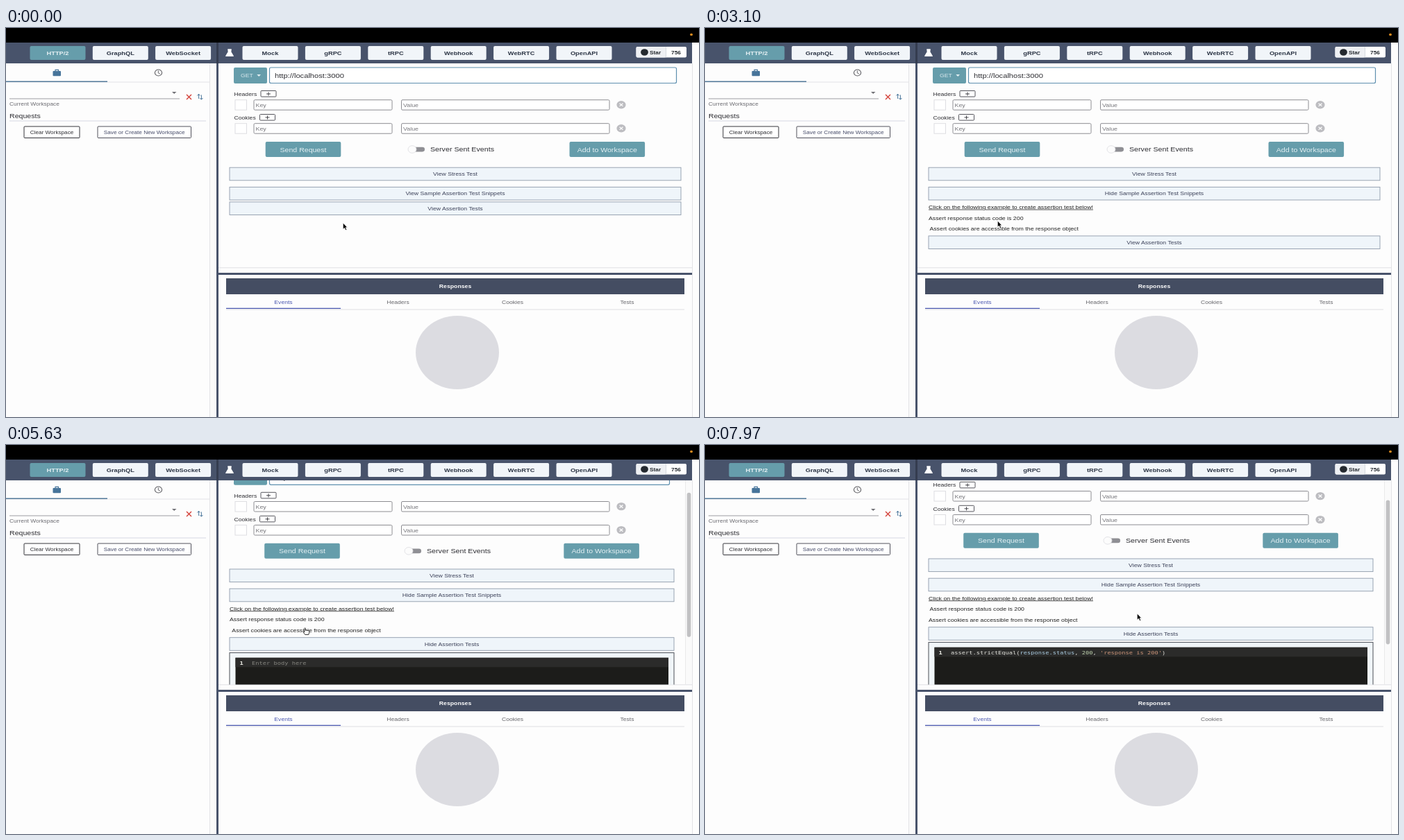
These frames come from a looping animation (998 px wide and 561 px high, 8 s). An HTML page:

```html
<!DOCTYPE html>
<html lang="en">
<head>
<meta charset="utf-8">
<title>API test client</title>
<style>
  html, body { margin: 0; width: 100%; height: 100%; overflow: hidden; background: #fdfdfd; }
  svg { display: block; width: 998px; height: 561px; }
  text { white-space: pre; }
</style>
</head>
<body>
<svg viewBox="0 0 998 561">
  <defs>
    <clipPath id="paneClip"><rect x="306" y="51" width="682" height="294.5"/></clipPath>
  </defs>
  <g id="chrome"></g>
  <g clip-path="url(#paneClip)"><g id="pane"></g></g>
  <g id="scrollbar">
    <rect x="978" y="51" width="10" height="294" fill="#fafafa"/>
    <path d="M978.5 51V345" stroke="#e9e9ea"/>
    <rect id="thumb" x="980.7" width="5.6" height="208" rx="2.8" fill="#c1c1c3"/>
  </g>
  <g id="cursor" stroke-linejoin="round">
    <path id="arrow" d="M0 0V9.2L2.2 7.3 3.8 10.6 5.4 9.9 3.9 6.7H6.4Z" fill="#000" stroke="#fff" stroke-width=".7"/>
    <path id="hand" d="M-1.7 5.6V1Q-.8-.4 0 1V4L1.2 3.6 2.3 4.1 3.5 4 4.6 4.6Q5.5 4.6 5.3 6.2L4.3 10H-.8L-3.2 6.8Q-3.4 5.4-1.7 6.5Z" fill="#fff" stroke="#222" stroke-width=".9"/>
  </g>
</svg>
<script>
const LOOP = 8000;
const ASPECT = 1.155; // the screen is shown slightly wider than tall
const SANS = "'Liberation Sans', Arial, sans-serif";
const MONO = "'DejaVu Sans Mono', monospace";
const NAVY = '#48536b', TEAL = '#669dab', INK = '#2e2e33', BLUE = '#4a57b0';
const $ = id => document.getElementById(id);

const rect = (x, y, w, h, fill, stroke = 'none', r = 0, width = 1) =>
  `<rect x="${x}" y="${y}" width="${w}" height="${h}" rx="${r}" fill="${fill}" stroke="${stroke}" stroke-width="${width}"/>`;
const path = (d, stroke, width = 1, fill = 'none') =>
  `<path d="${d}" fill="${fill}" stroke="${stroke}" stroke-width="${width}"/>`;
const ellipse = (x, y, rx, ry, fill, more = '') =>
  `<ellipse cx="${x}" cy="${y}" rx="${rx}" ry="${ry}" fill="${fill}" ${more}/>`;
// y is the middle of the capitals
const label = (str, x, y, size, fill = INK, { anchor = 'start', weight = 400, font = SANS, more = '' } = {}) =>
  `<text transform="translate(${x} ${y + size * .36}) scale(${ASPECT} 1)" font-family="${font}" font-size="${size}" ` +
  `font-weight="${weight}" text-anchor="${anchor}" fill="${fill}" ${more}>${str}</text>`;
const centred = (str, x, y, size, fill, weight) => label(str, x, y, size, fill, { anchor: 'middle', weight });

function navButton(name, x, active) {
  return rect(x, 26, 80, 20, active ? TEAL : '#f1f5f9', 'none', 2) +
    centred(name, x + 40, 36, 8.05, active ? '#e6f1f4' : '#2b3444', 700);
}

function drawChrome() {
  const left = ['HTTP/2', 'GraphQL', 'WebSocket'].map((n, i) => navButton(n, 34.5 + i * 90.3, !i));
  const right = ['Mock', 'gRPC', 'tRPC', 'Webhook', 'WebRTC', 'OpenAPI'].map((n, i) => navButton(n, 340.5 + i * 90.4));
  const tabs = ['Events', 'Headers', 'Cookies', 'Tests'].map((n, i) =>
    centred(n, 399.5 + i * 165, 395, 7.45, i ? '#66666b' : BLUE));
  return [
    rect(0, 0, 998, 21, '#000'), ellipse(987, 9.5, 2, 1.8, '#d98a1f'),
    rect(0, 21, 988, 30, NAVY), ...left, ...right,
    rect(303, 21, 3, 30, '#343c4f'),
    path('M320 31H324V34.5L327.5 40.5H316.5L320 34.5Z', '#fff', 1, '#fff'),
    path('M319 31H325', '#fff'),
    rect(907.5, 27, 72.5, 15.5, '#fff', 'none', 2),
    rect(907.5, 27, 43, 15.5, '#eef0f3', 'none', 2),
    path('M950.5 27V42.5', '#cfd3d8', .8),
    ellipse(919.5, 35, 5.4, 4.8, '#24292f'),
    label('Star', 927, 35, 7.2, '#24292f', { weight: 700 }),
    centred('756', 965, 35, 7.2, '#24292f', 700),

    // workspace column
    rect(293, 51, 10, 510, '#fafafa'), path('M293.5 51V561', '#e3e3e6'),
    path('M988.5 51V561', '#e3e3e6'),
    rect(303, 51, 3, 510, NAVY),
    path('M0 78H293', '#e2e2e6'), path('M0 77.2H146', '#52799a', 1.6),
    rect(67.5, 62, 11.5, 7.2, '#47749a', 'none', 1), path('M71 62V60.3H75.5V62', '#47749a', 1.2),
    ellipse(219.5, 64.5, 5.1, 4.5, 'none', 'stroke="#606065" stroke-width="1.1"'),
    path('M219.3 61.5V64.8L221.8 66.2', '#606065', 1),
    path('M239 92L242.2 95 245.5 92Z', 'none', 0, '#717176'),
    path('M5 102H250', '#929297', .9),
    path('M260 96L267 103M267 96L260 103', '#d23a32', 1.3),
    path('M277.6 102V95.5M275.6 97.5L277.6 95.3 279.6 97.5M281.4 96.5V103M279.4 101L281.4 103.2 283.4 101', '#47749a', 1),
    label('Current Workspace', 5, 109.5, 7.25, '#6a6a70'),
    label('Requests', 5, 127, 9.2),
    path('M5 134H288', '#d5d8e2'),
    rect(26, 142, 80, 16.5, '#fff', '#34343a', 1), centred('Clear Workspace', 66, 150.5, 7.1),
    rect(132, 142, 134.5, 16.5, '#fff', '#50505a', 1),
    centred('Save or Create New Workspace', 199.2, 150.5, 7.1, '#454a68'),

    // responses
    path('M306 345.8H988', '#e0e0e4'), rect(306, 353, 682, 3, NAVY),
    rect(317, 361, 660, 23, '#444d62'), centred('Responses', 647, 372.3, 7.55, '#fff', 700),
    ...tabs,
    path('M317 406H977', '#dedee2'), path('M317 404.3H482', BLUE, 1.3),
    ellipse(650, 468, 60, 53, '#dcdce1')
  ].join('');
}

function fieldRow(name, y, plusX) {
  return label(name, 328.5, y, 7.5) +
    rect(plusX, y - 4.5, 22, 8.6, '#fff', '#55555c', 1) +
    path(`M${plusX + 8} ${y}h6m-3-2.6v5.2`, '#35353c', .9) +
    rect(330, y + 8.7, 16.5, 14.5, '#fff', '#dedee2') +
    [['Key', 357, 199], ['Value', 569.5, 299.5]].map(([hint, x, w]) =>
      rect(x, y + 8.7, w, 14.5, '#fff', '#8c8c91', 1.5) + label(hint, x + 2.5, y + 16, 7.7, '#77777c')).join('') +
    ellipse(886, y + 15.8, 6.6, 5.7, '#bdbdc1') +
    path(`M883.6 ${y + 13.7}l4.8 4.2m0-4.2l-4.8 4.2`, '#fff', 1.2);
}

const tealButton = (name, x, y) =>
  rect(x - 54.3, y - 11, 108.6, 22, TEAL, 'none', 2) + centred(name, x, y + .3, 9.15, '#e4f0f3');

function drawPane({ snippets, tests, filled, statusShift, cookieShift }) {
  const inset = tests ? 10 : 0; // room taken by the scrollbar
  const mid = 647 - inset / 2;
  const bar = (name, y) => rect(322, y - 9.3, 650 - inset, 18.6, '#eff5fa', '#8f9bab', 0, .9) +
    centred(name, mid, y, 7.53, '#3b4058');
  const switchX = 579 - inset / 2;
  const out = [
    rect(328, 57, 48, 23, TEAL, 'none', 2), label('GET', 338, 68.5, 7.5, '#d9e9ed'),
    path('M361.3 67L364.2 70 367 67Z', 'none', 0, '#e4f0f3'),
    rect(379.5, 57, 586 - inset, 22.5, '#fff', '#5d8fae', 2, 1.2),
    label('http://localhost:3000', 387, 68.4, 9.67),
    fieldRow('Headers', 95, 367), fieldRow('Cookies', 129, 365.5),
    tealButton('Send Request', 428 - inset * .15, 175),
    rect(switchX + 4, 171.8, 20, 6.6, '#8f8f94', 'none', 3.3),
    ellipse(switchX + 6, 175, 6, 5.3, '#fcfcfc', 'stroke="#dcdce0" stroke-width=".8"'),
    label('Server Sent Events', 611 - inset / 2, 175, 9.25),
    tealButton('Add to Workspace', 865.8 - inset * .82, 175),
    bar('View Stress Test', 210.5),
    bar(`${snippets ? 'Hide' : 'View'} Sample Assertion Test Snippets`, 238.7)
  ];
  if (snippets) out.push(
    label('Click on the following example to create assertion test below!', 322, 258, 7.6, '#222', { more: 'text-decoration="underline"' }),
    label('Assert response status code is 200', 322 + statusShift, 273.8, 7.6, '#222'),
    label('Assert cookies are accessible from the response object', 322 + cookieShift, 289.4, 7.6, '#222'));
  out.push(bar(`${tests ? 'Hide' : 'View'} Assertion Tests`, snippets ? 309.2 : 260.2));
  if (tests) {
    const span = (color, str) => `<tspan fill="${color}">${str}</tspan>`;
    const code = filled
      ? 'assert.strictEqual(' + span('#a9cbe0', 'response.status') + ', ' + span('#bfd3ae', '200') + ', ' +
        span('#cb9478', "'response is 200'") + ')'
      : span('#85857f', 'Enter body here');
    out.push(
      rect(322, 321.8, 640, 120, '#f1f6f9', '#4b4f57'),
      rect(330.5, 329, 623.5, 105, '#1c1c1a'), rect(330.5, 329, 623.5, 13.5, '#2b2b2a'),
      label('1', 336.5, 336.3, 7.55, '#f0f0ea', { font: MONO, weight: 700 }),
      label(code, 354, 336.3, 7.55, '#e2e2dc', { font: MONO }));
  }
  return out.join('');
}

// Each key is [time, ...values]; values ease from one key to the next.
function track(keys, t) {
  let i = keys.findIndex(k => k[0] > t);
  if (i < 0) return keys.at(-1).slice(1);
  const a = keys[i - 1], b = keys[i];
  const u = (t - a[0]) / (b[0] - a[0]), e = u * u * (3 - 2 * u);
  return a.slice(1).map((v, j) => v + (b[j + 1] - v) * e);
}

const pointerPath = [
  [0, 485.3, 281], [1300, 485.3, 281], [1750, 485.3, 237.3], [2450, 485.3, 237.3], [2800, 440, 286],
  [3100, 421.3, 278], [3300, 421, 276], [3700, 492, 309], [4000, 492, 308], [4230, 492, 298.8],
  [4900, 470, 290], [5350, 431.5, 263.5], [5750, 431.5, 263.5], [6150, 421, 251.5], [7350, 421, 251.5],
  [7850, 612, 238], [7970, 622.3, 243], [LOOP, 622.3, 243]
];
const handTimes = [[1600, 2500], [2700, 2980], [3250, 4150], [5200, 7930]];
const scrollKeys = [[0, 0], [4450, 0], [4850, 22.2], [7100, 22.2], [7450, 37.2], [LOOP, 37.2]];
const statusKeys = [[0, 0], [2600, 0], [2700, 2], [2850, 0], [5800, 0], [6000, 3.3], [7860, 3.3], [8060, 0]];
const cookieKeys = [[0, 0], [2720, 0], [2850, 3.3], [2990, 3.3], [3190, 0], [3400, 0], [3550, 3.3],
  [3700, 0], [5150, 0], [5350, 3.3], [5800, 3.3], [6000, 0], [LOOP, 0]];

let shown = '';
function frame() {
  const t = performance.now() % LOOP;
  const state = {
    snippets: t >= 2250, tests: t >= 3850, filled: t >= 6850,
    statusShift: track(statusKeys, t)[0], cookieShift: track(cookieKeys, t)[0]
  };
  const key = JSON.stringify(state);
  if (key !== shown) {
    $('pane').innerHTML = drawPane(state);
    shown = key;
  }
  const [scroll] = track(scrollKeys, t);
  $('pane').setAttribute('transform', `translate(0 ${-scroll})`);
  $('scrollbar').style.display = state.tests ? '' : 'none';
  $('thumb').setAttribute('y', 53 + scroll * .71);

  const [x, y] = track(pointerPath, t);
  const isHand = handTimes.some(([from, to]) => t >= from && t < to);
  $('cursor').setAttribute('transform', `translate(${x} ${y})`);
  $('arrow').style.display = isHand ? 'none' : '';
  $('hand').style.display = isHand ? '' : 'none';
  requestAnimationFrame(frame);
}

$('chrome').innerHTML = drawChrome();
frame();
</script>
</body>
</html>
```
